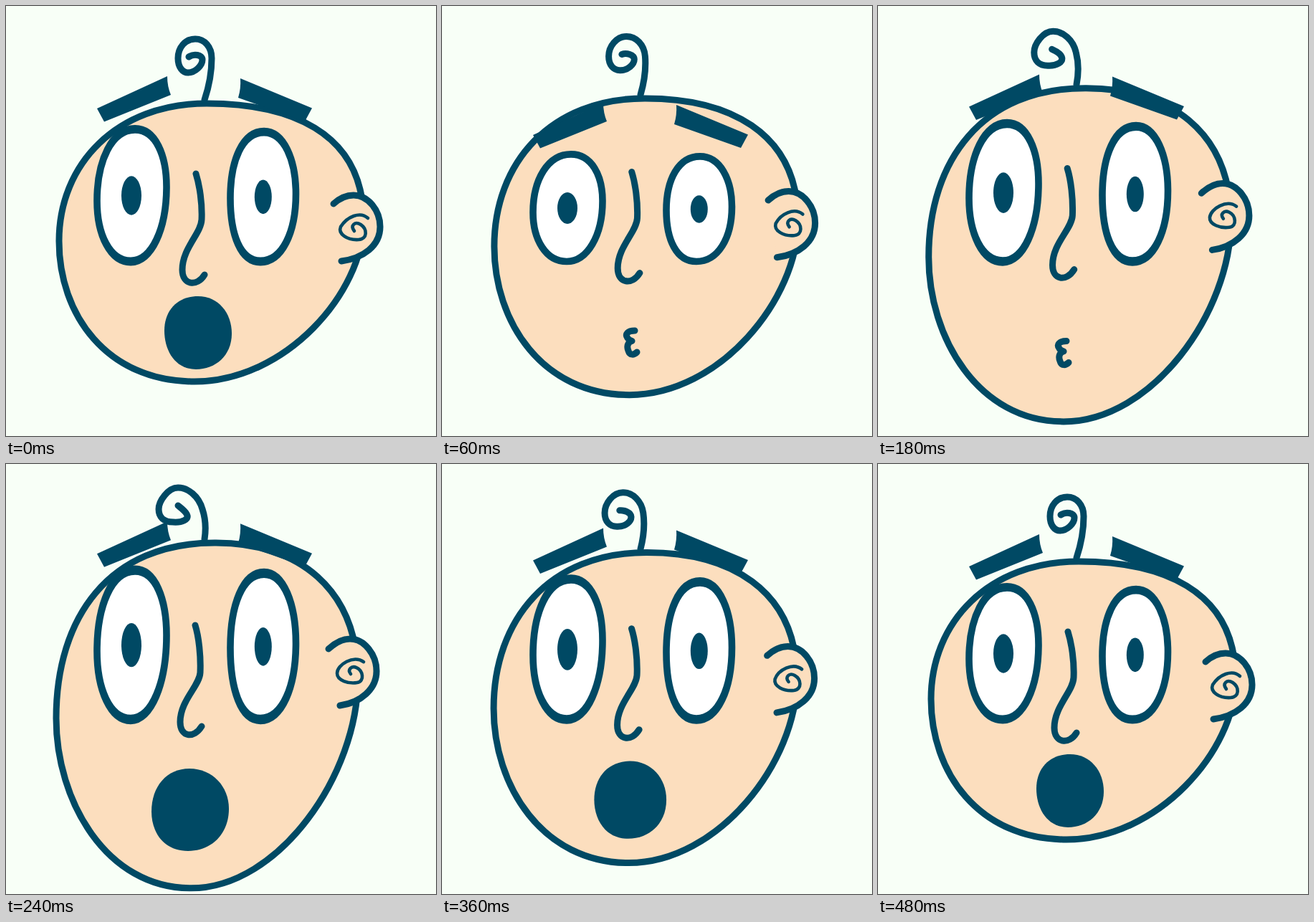
These frames come from a looping animation (600 px wide and 600 px high, 720 ms). An HTML page:

```html
<!DOCTYPE html>
<html lang="en">
<head>
<meta charset="utf-8">
<title>Talking head</title>
<style>
  html, body { margin: 0; width: 100%; height: 100%; overflow: hidden; background: #f8fff7; }
  svg { display: block; width: 100%; height: 100%; }
  .line { fill: none; stroke: #004964; stroke-width: 9; stroke-linecap: round; stroke-linejoin: round; }
  .skin { fill: #fcdebe; }
  .white { fill: #fff; stroke-width: 9.6; }
  .thin { stroke-width: 4.6; }
  .ink { fill: #004964; }
</style>
</head>
<body>
<svg viewBox="0 0 600 600">
  <path id="hair" class="line"/>
  <path id="head" class="line skin"/>
  <path id="ear" class="line skin"/>
  <path id="curl" class="line thin"/>
  <g id="eyes">
    <path class="line white" d="M180 207C209 207 224 237 224 272C224 320 203 356.500 174 356.500C145 356.500 127 326 127 288C127 242 148 207 180 207Z"/>
    <path class="line white" d="M360 210C388 210 404.500 242 404.500 280C404.500 324 385 356.500 355 356.500C327 356.500 313 326 313 285C313 242 330 210 360 210Z"/>
    <ellipse class="ink" cx="175" cy="282" rx="14" ry="22"/>
    <ellipse class="ink" cx="358.800" cy="283.500" rx="12" ry="19.300"/>
  </g>
  <path id="nose" class="line"/>
  <path id="mouth" class="ink"/>
  <path id="pucker" class="line" d="M269 453C259 453 255 458 258.500 462.500C260 466 264 467 265 467.500C259 469 257.500 475 260 481C262 488 268 487 272 483"/>
  <g id="brows" class="ink">
    <path d="M127 143L225 98Q225 112 230 124L137 161.500Z"/>
    <path d="M327 101L427 142.500L417 161L324 128Q328 115 327 101Z"/>
  </g>
</svg>
<script>
const STEP = 30, LOOP = 720, LAST = 480;
const PEAK = 229, END = 471, UNIT = 60;   // stretch rises until PEAK, is back at rest at END
const FULL = 3.65;                        // stretch of the long pose below

// Each part: resting pose, long pose.
const poses = {
  head: [
    'M280 136C390 136 499 172 499 300C499 400 390 524 263 524C140 524 74 430 74 328C74 220 155 136 280 136Z',
    'M293 110C407 110 491 173 491 300C491 433 381 592 258 592C140 592 70 470 70 355C70 215 143 109 293 110Z'],
  hair: [
    'M277 131C283 113 287 92 287 73C287 57 277 46 264 46C250 46 240 58 240 73C240 86 247 93 254 93C264 93 274 83 274 75C274 68 262 66 255 71',
    'M277 105C279 92 279 78 274 63C269 45 254 33 240 33C226 33 213 52 213 63C213 74 220 81 233 81C247 82 254 77 253 72C252 67 245 62 240 58'],
  ear: [
    'M457 276C468 266 478 264 485 264C505 264 522 285 522 308C522 335 498 352 468 356',
    'M450 258C461 248 472 244 480 244C500 244 517 266 517 289C517 314 495 333 466 337'],
  curl: [
    'M505 296C494 286 476 294 467 308C463 318 476 327 492 326C505 325 504 311 495 305C487 300 480 306 486 314',
    'M499 276C485 266 462 280 462 292C462 302 478 307 490 305C501 303 498 288 489 284C482 281 476 287 481 293'],
  nose: [
    'M265 234C270 250 274 275 273 298C272 318 246 338 246 368C246 390 267 392 277 375',
    'M264 225C269 241 272 268 271 291C270 310 243 330 243 360C243 381 262 384 273 366'],
  mouth: [
    'M268 405C296 405 315 428 315 457C315 488 292 507 265 507C237 507 221 482 221 453C221 424 240 405 268 405Z',
    'M256 425C288 425 311 450 311 481C311 516 287 540 254 540C219 540 203 513 203 485C203 450 224 425 256 425Z']
};

const el = id => document.getElementById(id);
const set = (id, name, value) => el(id).setAttribute(name, value);

function blend([a, b], k) {
  const to = b.match(/\d+/g);
  let i = 0;
  return a.replace(/\d+/g, n => (+n + (to[i++] - n) * k).toFixed(2));
}

function stretch(t) {
  if (t <= PEAK) return t / UNIT;
  return Math.max(0, PEAK / UNIT * (END - t) / (END - PEAK));
}

function draw(time) {
  const t = Math.min(LAST, Math.floor(time % LOOP / STEP) * STEP);
  const s = stretch(t);
  const shut = t > 0 && t < PEAK;

  for (const id in poses) set(id, 'd', blend(poses[id], s / FULL));

  // Eyes and brows snap down, rise with the pucker, then settle slowly.
  const eye = shut ? 0.857 + 0.1435 * s : 1.235 + 0.0435 * s;
  const brow = shut ? 56.8 - 19.8 * s : -4.9 * s;
  set('eyes', 'transform', `translate(0 ${356.5 * (1 - eye)}) scale(1 ${eye})`);
  set('brows', 'transform', `translate(0 ${brow})`);

  set('mouth', 'visibility', shut ? 'hidden' : 'visible');
  set('pucker', 'visibility', shut ? 'visible' : 'hidden');
  set('pucker', 'transform', `translate(${-3 * (s - 1)} ${7.25 * (s - 1)})`);
}

let start;
function tick(now) {
  start ??= now;
  draw(now - start);
  requestAnimationFrame(tick);
}
draw(0);
requestAnimationFrame(tick);
</script>
</body>
</html>
```
